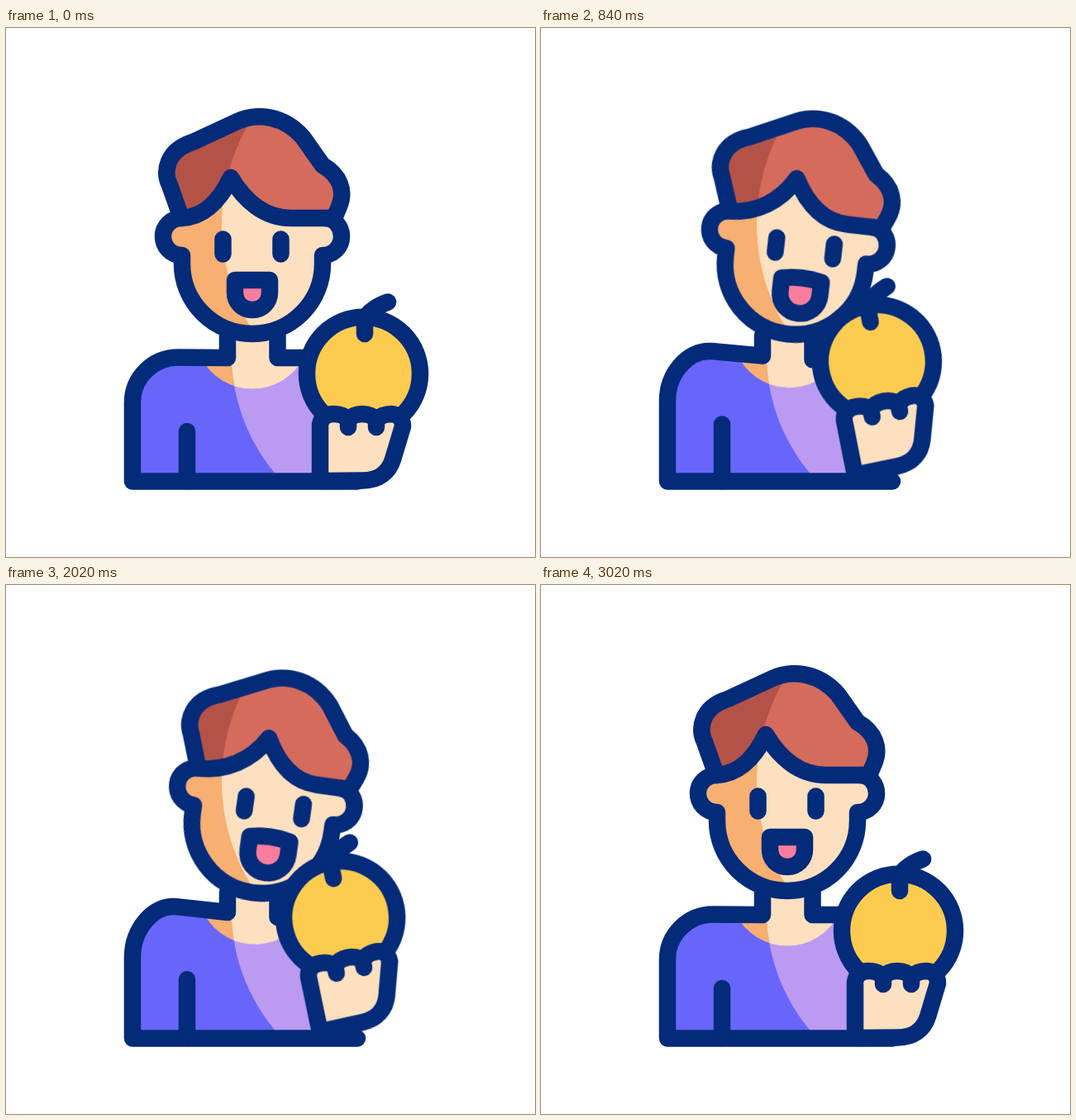
Write an HTML page that moves like this. It is 640 px wide and 640 px high and loops after 3.1 s.

```html
<!DOCTYPE html>
<html lang="en">
<head>
<meta charset="utf-8">
<title>Person holding an orange</title>
<style>
html, body { margin: 0; width: 100%; height: 100%; overflow: hidden; background: #fff; }
svg { display: block; width: 100vw; height: 100vh; }

.line { fill: none; stroke: #032b79; stroke-width: 20.5; stroke-linecap: round; stroke-linejoin: round; }
.skin { fill: #fce0bf; }
.shade .skin { fill: #f7af72; }
.hair { fill: #d46b5d; }
.shade .hair { fill: #b35348; }
.shirt { fill: #bb9af2; }
.shade .shirt { fill: #6865fb; }

/* Shapes that bend: --a at rest, --b when leaning or open */
.shirt {
  --a: path("M153 548 L153 453 C153 423 178 398.5 208 398.5 L268 399 L328.5 399 L375 399 L375 548 Z");
  --b: path("M153 548 L153 450 C153 418 177 386 206 389 L268 396 L328.5 402 L375 407 L375 548 Z");
}
.left {
  --a: path("M268 372 L268 399 L208 398.5 C178 398.5 153 423 153 453 L153 548.5 L425 548.5");
  --b: path("M268 372 L268 396 L206 389 C177 386 153 418 153 450 L153 548.5 L425 548.5");
}
.right {
  --a: path("M328.5 372 L328.5 399 L375 399");
  --b: path("M328.5 372 L328.5 402 L375 407");
}
.slot {
  --a: path("M219 548 L219 488");
  --b: path("M219 548 L219 477");
}
.hair, .fringe {
  --a: path("M213 230 L210 224 L198 190 C190 174 194 148 226 138 L280 113 C304 102 336 106 359 132 L383 166 C404 178 411 197 403 216 L397 230 L345 230 C312 230 288 208 272 181 C258 210 240 228 213 230 Z");
  --b: path("M213 230 L210 224 L198 190 C190 174 194 148 226 138 L280 113 C304 102 336 106 359 132 L383 166 C404 178 411 197 403 216 L397 230 L357 230 C326 230 306 208 292 182 C275 212 245 229 213 230 Z");
}
.lips {
  --a: path("M277 305 Q298 305 319 305 L319 320 C319 332 310 341 298 341 C286 341 277 332 277 320 Z");
  --b: path("M273.5 303 Q298 297 322.5 303 L322.5 319 C322.5 334 311 344 298 344 C285 344 273.5 334 273.5 319 Z");
  fill: #fb7d9c;
}
.face { d: path("M386 230 C398 230 406 241 406 252 C406 265 396 275 383 275 V285 A85 85 0 0 1 213 285 V275 C199 275 190 264 190 252 C190 240 200 230 212 230 L240 190 H360 Z"); }
.jaw { d: path("M386 230 C398 230 406 241 406 252 C406 265 396 275 383 275 V285 A85 85 0 0 1 213 285 V275 C199 275 190 264 190 252 C190 240 200 230 212 230"); }

.head { --to: rotate(8deg); transform-origin: 282px 372px; }
.features { --to: translate(12px, 0); }
.collar { --to: translate(0, -2px) rotate(5.7deg); transform-origin: 298px 399px; }
.arm { --to: rotate(-12.2deg); transform-origin: 343px 545px; }

.head { animation: lean 3.1s infinite cubic-bezier(.167, 0, .05, 1), bob 3.1s infinite ease-in-out; }
.features { animation: lean 3.1s infinite cubic-bezier(.167, 0, .05, 1); }
.hair, .fringe { d: var(--a); animation: leanShape 3.1s infinite cubic-bezier(.167, 0, .05, 1); }
.collar { animation: shrug 3.1s infinite cubic-bezier(.3, 0, .05, 1); }
.shirt, .left, .right, .slot { d: var(--a); animation: shrugShape 3.1s infinite cubic-bezier(.3, 0, .05, 1); }
.arm { animation: lift 3.1s infinite cubic-bezier(.35, 0, .65, 1); }
.lips { d: var(--a); animation: bite 3.1s infinite cubic-bezier(.35, 0, .65, 1); }

@keyframes lean { 0%, 96.77%, 100% { transform: none; } 64.52% { transform: var(--to); } }
@keyframes leanShape { 0%, 96.77%, 100% { d: var(--a); } 64.52% { d: var(--b); } }
@keyframes shrug {
  0%, 87.1%, 100% { transform: none; }
  64.52% { transform: var(--to); animation-timing-function: cubic-bezier(.167, 0, .05, 1); }
}
@keyframes shrugShape {
  0%, 87.1%, 100% { d: var(--a); }
  64.52% { d: var(--b); animation-timing-function: cubic-bezier(.167, 0, .05, 1); }
}
@keyframes lift { 0%, 3.23%, 43.87%, 83.5%, 100% { transform: none; } 23.23%, 62.9% { transform: var(--to); } }
@keyframes bite { 0%, 43.87%, 96.77%, 100% { d: var(--a); } 23.23%, 64.52% { d: var(--b); } }
@keyframes bob { 0%, 14%, 38%, 100% { translate: 0 0; } 27% { translate: 0 -1.5px; } }
</style>
</head>
<body>
<svg viewBox="0 0 640 640">
  <clipPath id="bodyLight"><circle cx="496" cy="395" r="223"/></clipPath>
  <clipPath id="headLight"><circle cx="502" cy="237" r="241"/></clipPath>

  <!-- body -->
  <g class="shade">
    <path class="shirt"/>
    <path class="skin collar" d="M236 399A70 70 0 0 0 360 399Z"/>
  </g>
  <g clip-path="url(#bodyLight)">
    <path class="shirt"/>
    <path class="skin collar" d="M236 399A70 70 0 0 0 360 399Z"/>
    <path class="skin" d="M268 360H328V404H268Z"/>
  </g>
  <g class="line">
    <path class="left"/>
    <path class="right"/>
    <path class="slot"/>
  </g>

  <!-- head -->
  <g class="head shade">
    <path class="skin face"/>
    <path class="hair"/>
  </g>
  <g clip-path="url(#headLight)">
    <g class="head">
      <path class="skin face"/>
      <path class="hair"/>
    </g>
  </g>
  <g class="head line">
    <path class="jaw"/>
    <path class="fringe"/>
    <g class="features">
      <path d="M262.5 255.5V273.5M332.5 255.5V273.5"/>
      <path class="lips"/>
    </g>
  </g>

  <!-- arm and fruit -->
  <g class="arm line">
    <circle cx="432.5" cy="418.3" r="68.5" fill="#fdcb50"/>
    <path d="M434 370V352Q441 339 462 331.5"/>
    <path class="skin" d="M380 548V480Q382 467 397 467Q408 467 414 474Q420 467 431 467Q442 467 448 474Q455 467 466 467Q480 468 480 482L468 522C463 538 450 547.5 432 547.5Z"/>
    <path d="M414 474V483M448 474V483"/>
  </g>
</svg>
</body>
</html>
```
